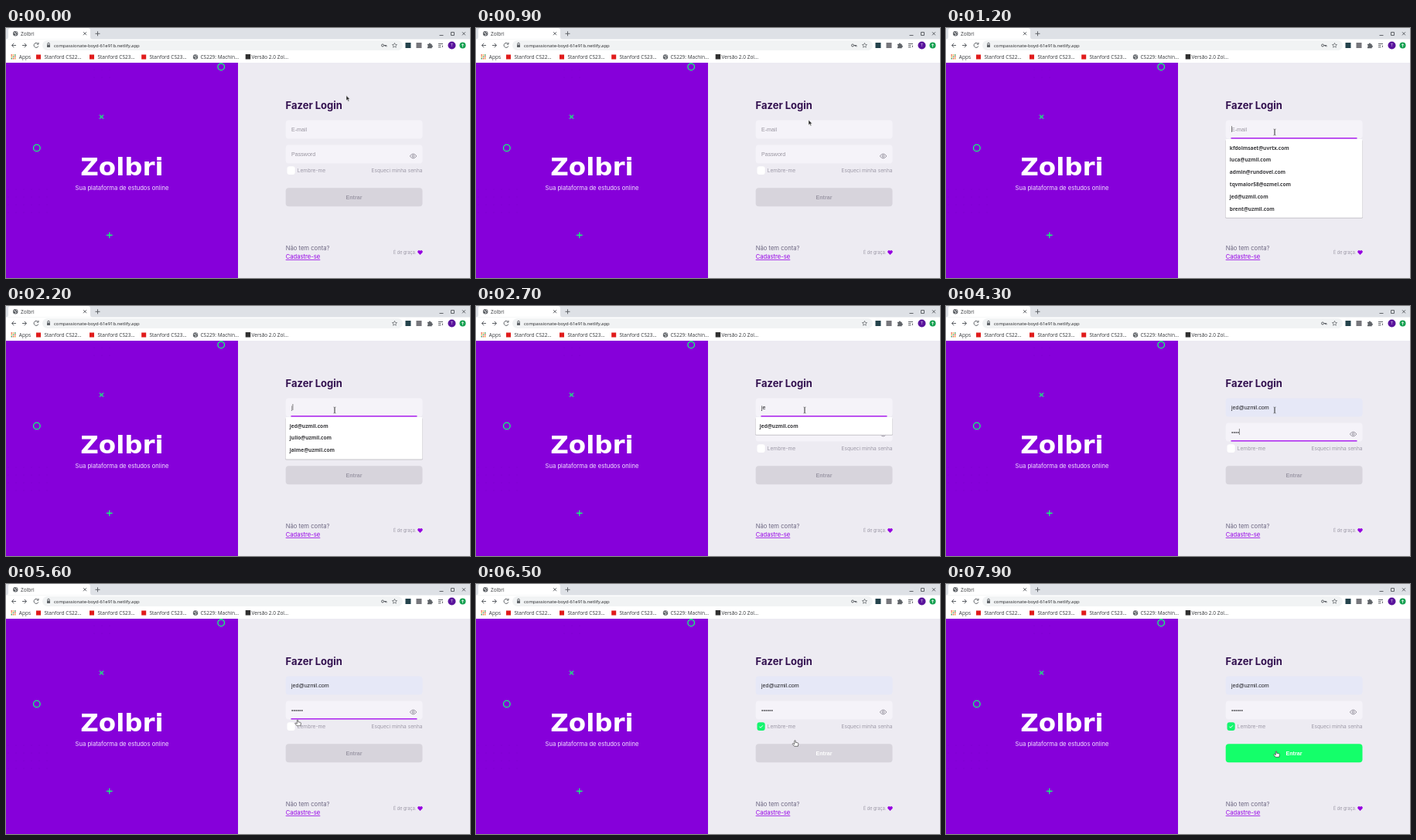
These frames come from a looping animation (600x324 px, 8000 ms). An HTML page:

```html
<!DOCTYPE html>
<html lang="pt-BR">
<head>
<meta charset="utf-8">
<title>Zolbri</title>
<style>
html, body { margin: 0; height: 100%; overflow: hidden; background: #edebf2; }
svg { display: block; width: 100vw; height: 100vh; }
.ui { font: 6.5px "Open Sans", "Noto Sans", sans-serif; fill: #35383b; }
.url { font-size: 5.95px; fill: #202124; }
.page { font-family: Inter, sans-serif; fill: #6c6680; }
.small { font-size: 6.6px; fill: #9c98a6; }
.medium { font-size: 7.65px; }
.field { font: 7.1px "Liberation Sans", Arial, sans-serif; fill: #202024; }
.hint { fill: #98949f; }
.option { font: 700 6.6px "Open Sans", "Noto Sans", sans-serif; fill: #3a3a3d; }
.line { fill: none; stroke: #5f6368; stroke-width: 1; }
.green { fill: none; stroke: #14ff76; stroke-width: 1.3; }
</style>
</head>
<body>
<svg viewBox="0 0 600 324">
  <!-- browser window -->
  <rect width="600" height="46" fill="#fff"/>
  <rect width="600" height="14.5" fill="#dee1e6"/>
  <path d="M0 14.5q3 0 3-3V3q0-3 3-3h100q3 0 3 3v8.500q0 3 3 3z" fill="#fff"/>
  <g id="globes"></g>
  <g class="line">
    <path d="M100 5.200l4 4m0-4l-4 4M118.500 4.300v6m-3-3h6M560.500 9.500h5M575.500 5.500h4v4h-4zM590 5.300l4 4m0-4l-4 4"/>
    <path d="M13 22.500H7.500m2.700-2.700l-2.700 2.700 2.700 2.700M21 22.500h5.500m-2.700-2.700l2.700 2.700-2.700 2.700"/>
    <path d="M41.500 20.600a3 3 0 1 0 .4 2.800M42 18.800v2.300h-2.300"/>
  </g>
  <rect x="47" y="16" width="466" height="13" rx="6.500" fill="#f1f3f4"/>
  <path d="M53.700 21.500v-1a1.300 1.300 0 0 1 2.600 0v1" class="line"/>
  <rect x="53" y="21.500" width="4" height="3.500" rx=".5" fill="#5f6368"/>
  <g id="key" class="line"><circle cx="487" cy="22.500" r="1.500"/><path d="M488.500 22.500h3.500v1.800m-1.600-1.800v1.500"/></g>
  <path d="M502.500 19.400l.9 2 2.200.2-1.700 1.500.5 2.100-1.900-1.100-1.900 1.100.5-2.100-1.700-1.500 2.200-.2z" class="line" style="stroke-width:.7"/>
  <rect x="516.500" y="19" width="7" height="7" fill="#24434c"/>
  <rect x="530.500" y="19" width="7" height="7" fill="#77777c"/>
  <path d="M545 20.800h1.800a1.200 1.200 0 0 1 2.400 0h1.500v1.700a1.200 1.200 0 0 1 0 2.400v1.300h-5.700v-1.800a1.100 1.100 0 0 0 0-2.100z" fill="#5f6368"/>
  <path d="M559 20.500h6m-6 2.200h3.500m-3.500 2.200h3.500m2-2.400v2.400" class="line"/>
  <circle cx="576.500" cy="22.500" r="5" fill="#5a149c"/>
  <text x="576.500" y="24.300" text-anchor="middle" class="ui" style="font-size:4.500px;fill:#fff">T</text>
  <circle cx="590.500" cy="22.500" r="4" fill="#14a050"/>
  <path d="M590.500 24.700v-4m-1.600 1.600l1.600-1.600 1.600 1.600" class="line" style="stroke:#fff;stroke-width:.8"/>
  <g id="apps"></g>
  <g fill="#e01b1b"><rect x="39" y="34.500" width="6" height="6"/><rect x="108" y="34.500" width="6" height="6"/><rect x="175.200" y="34.500" width="6" height="6"/></g>
  <rect x="309.700" y="34" width="6.500" height="6.500" fill="#303030"/>
  <g class="ui">
    <text x="19" y="9.700">Zolbri</text>
    <text x="62" y="24.500" class="url">compassionate-boyd-61e91b.netlify.app</text>
    <text x="16.800" y="39.700">Apps</text>
    <text x="49.500" y="39.700">Stanford CS22…</text>
    <text x="118.500" y="39.700">Stanford CS23…</text>
    <text x="185.500" y="39.700">Stanford CS23…</text>
    <text x="251.500" y="39.700">CS229: Machin…</text>
    <text x="317.500" y="39.700">Versão 2.0 Zol…</text>
  </g>

  <!-- left panel -->
  <rect y="45" width="600" height="279" fill="#edebf2"/>
  <rect y="45" width="300" height="279" fill="#8600da"/>
  <g id="dots" fill="#7a00c8"></g>
  <g class="green">
    <circle cx="278.200" cy="50.300" r="4.300"/><circle cx="39.800" cy="155.400" r="4.300"/>
    <path d="M121 112.600l5 5m0-5l-5 5M130 268.500h7.600m-3.800-3.800v7.600"/>
  </g>
  <text x="150" y="191" text-anchor="middle" fill="#fff" style="font:bold 32.500px 'DejaVu Sans',sans-serif">Zolbri</text>
  <text x="150" y="210" text-anchor="middle" class="page medium" style="fill:#f3e4ff">Sua plataforma de estudos online</text>

  <!-- form -->
  <text x="361.500" y="105.200" class="page" style="font-size:13px;font-weight:700;fill:#32104f">Fazer Login</text>
  <rect id="mailBox" x="361.700" y="119.500" width="176.800" height="24" rx="4"/>
  <rect x="361.700" y="151.500" width="176.800" height="24" rx="4" fill="#f5f3f9"/>
  <text id="mail" x="369" y="133.500" class="field"></text>
  <text id="pass" x="369" y="165.700" class="field"></text>
  <rect id="focus" x="368.500" width="163" height="1.300" fill="#a000ee"/>
  <rect id="caret" width=".7" height="8" fill="#555"/>
  <path d="M522.300 166q4.300-5.800 8.600 0q-4.300 5.800-8.600 0z" class="line" style="stroke:#8d8996;stroke-width:.9"/>
  <circle cx="526.600" cy="166" r="1.300" class="line" style="stroke:#8d8996;stroke-width:.9"/>
  <rect id="check" x="363.500" y="179.300" width="10.200" height="10.700" rx="3"/>
  <path id="tick" d="M366.500 184.800l1.500 1.500 2.900-3" fill="none" stroke="#fff"/>
  <g class="page">
    <text x="376.800" y="187" class="small">Lembre-me</text>
    <text x="538.500" y="187" class="small" text-anchor="end">Esqueci minha senha</text>
    <text x="361.700" y="288" class="medium">Não tem conta?</text>
    <text x="361.700" y="299" class="medium" style="fill:#9600e6;text-decoration:underline">Cadastre-se</text>
    <text x="501" y="292.700" class="small" style="font-size:5.500px">É de graça.</text>
  </g>
  <path d="M535.500 294l-3-3.100a1.700 1.700 0 0 1 3-2a1.700 1.700 0 0 1 3 2z" fill="#9600e0"/>
  <rect id="button" x="361.700" y="207.200" width="176.800" height="24" rx="4"/>
  <text id="enter" x="450" y="221.700" text-anchor="middle" class="field" style="font-weight:bold">Entrar</text>

  <!-- suggestions -->
  <g id="list">
    <rect id="shadow" x="361.200" y="145" width="177.700" rx="1.500" fill="#c6c4ca"/>
    <rect id="sheet" x="361.700" y="144" width="176.700" rx="1" fill="#fff"/>
    <rect id="picked" x="361.700" y="147.300" width="176.700" height="16" fill="#c2c1c4"/>
    <g id="options" class="option"></g>
  </g>

  <g id="mouse" stroke-width=".6" stroke-linejoin="round">
    <path id="arrow" d="M0 0v6.500l1.500-1.300 1.100 2.500 1.200-.5-1.100-2.400h2z" fill="#222" stroke="#eee"/>
    <path id="beam" d="M-1.500-4q1.500 0 1.500 1v6q0 1-1.500 1M1.500-4q-1.500 0-1.500 1v6q0 1 1.500 1" fill="none" stroke="#333"/>
    <path id="hand" d="M-.7.5q.7-1 1.400 0v2.300l2.700.5q1.200.3 1 1.500l-.6 3H-.8L-3.300 4.800q.3-1.300 1.500-.5l1.100.9z" fill="#fff" stroke="#222"/>
  </g>
</svg>
<script>
const $ = id => document.getElementById(id);
const set = (id, attrs) => { for (const k in attrs) $(id).setAttribute(k, attrs[k]); };
const show = (id, on) => set(id, { visibility: on ? 'visible' : 'hidden' });

$('globes').innerHTML = [[12.2, 7.2], [245, 37.5]].map(([x, y]) =>
  `<circle cx="${x}" cy="${y}" r="3.200" fill="#5f6368"/>
   <path d="M${x - 2.2} ${y - 1}l2 .5 1 1.500-1 1.500M${x + .5} ${y - 2.5}l1.700 1.700" fill="none" stroke="#fff" stroke-width=".8"/>`).join('');

const grid = (cols, rows, cell) =>
  Array.from({ length: cols * rows }, (_, i) => cell(i % cols, Math.floor(i / cols))).join('');
const dots = (left, top, cols, rows) => grid(cols, rows, (x, y) =>
  `<circle cx="${left + x * 10}" cy="${top + y * 10}" r=".6"/>`);
const appColors = ['#e5483b', '#e99b2c', '#3c9a55'];
$('apps').innerHTML = grid(3, 3, (x, y) =>
  `<rect x="${6.5 + x * 2.3}" y="${34.3 + y * 2.3}" width="1.500" height="1.500" fill="${appColors[(x + y) % 3]}"/>`);
$('dots').innerHTML = dots(3, 209, 6, 4) + dots(114, 54, 3, 2);

const chosen = 'jed@uzmil.com';
const allMails = ['kfdolmsaet@uvrtx.com', 'luca@uzmil.com', 'admin@rundovel.com',
  'tqvmaior58@ozmel.com', chosen, 'brent@uzmil.com'];
const jMails = [chosen, 'julio@uzmil.com', 'jaime@uzmil.com'];

// time, x, y of the pointer's hot spot
const path = [[0, 440, 87.5], [700, 440, 87.5], [1000, 425, 135], [5100, 425, 135],
  [5200, 423, 138], [5400, 398, 160], [5600, 377, 176], [5700, 370, 182],
  [6000, 370, 182], [6300, 390, 191], [6500, 412.5, 202.5], [6700, 427, 216.5], [8000, 427, 216.5]];
const keystrokes = [4000, 4100, 4200, 4300, 4600, 4700];

function pointer(t) {
  const i = path.findIndex(p => p[0] > t), [t0, x0, y0] = path[i - 1], [t1, x1, y1] = path[i];
  const k = (t - t0) / (t1 - t0);
  return [x0 + (x1 - x0) * k, y0 + (y1 - y0) * k];
}

function drawList(t) {
  const items = t < 2200 ? allMails : t < 2400 ? jMails : [chosen];
  const height = items.length * 15.8 + 7;
  set('list', { opacity: t < 1200 || t >= 3600 ? 0 : t < 3400 ? 1 : t < 3500 ? .8 : .3 });
  set('shadow', { height });
  set('sheet', { height });
  show('picked', t >= 3000);
  $('options').innerHTML = items.map((m, i) =>
    `<text x="366.800" y="${157.6 + i * 15.8}">${m}</text>`).join('');
}

function drawFields(t) {
  const mail = t < 2200 ? 'E-mail' : t < 2300 ? 'j' : t < 3000 ? 'je' : chosen;
  const typed = keystrokes.filter(k => k <= t).length;
  $('mail').textContent = mail;
  $('pass').textContent = typed ? '•'.repeat(typed) : 'Password';
  $('mail').classList.toggle('hint', t < 2200);
  $('pass').classList.toggle('hint', !typed);
  set('mail', { opacity: t === 2200 ? .65 : 1 });
  set('pass', { opacity: typed ? .75 : 1 });
  set('mailBox', { fill: t < 3000 ? '#f5f3f9' : '#e6e8f7' });

  const onMail = t < 3400;
  set('focus', { y: onMail ? 142.2 : 174.2 });
  show('focus', t >= 1100 && t < 5900);
  const empty = onMail ? t < 2200 : !typed;
  const width = empty ? 0 : $(onMail ? 'mail' : 'pass').getComputedTextLength();
  set('caret', { x: 369 + width, y: onMail ? 127 : 159 });
  const blink = [[1100, 1700], [2200, 2700], [3400, 5200], [5700, 5900]];
  show('caret', blink.some(([a, b]) => t >= a && t < b));
}

function draw(now) {
  const t = Math.floor(now % 8000 / 100) * 100;
  drawFields(t);
  drawList(t);
  show('key', t < 2200 || t >= 4000);

  const checked = t >= 5900;
  set('check', { fill: checked ? '#14f56e' : '#fff' });
  show('tick', checked);
  const hover = Math.min(1, Math.max(0, (t - 6500) / 200));
  const mix = (a, b) => Math.round(a + (b - a) * hover);
  set('button', { fill: `rgb(${mix(215, 20)},${mix(212, 255)},${mix(220, 106)})` });
  $('enter').style.fill = t < 6500 ? '#9c98a6' : '#fff';

  const [x, y] = pointer(t);
  set('mouse', { transform: `translate(${x} ${y})` });
  show('arrow', t < 1000);
  show('beam', t >= 1000 && t < 5600);
  show('hand', t >= 5600);
}

const start = performance.now();
function tick() {
  draw(performance.now() - start);
  requestAnimationFrame(tick);
}
tick();
</script>
</body>
</html>
```
